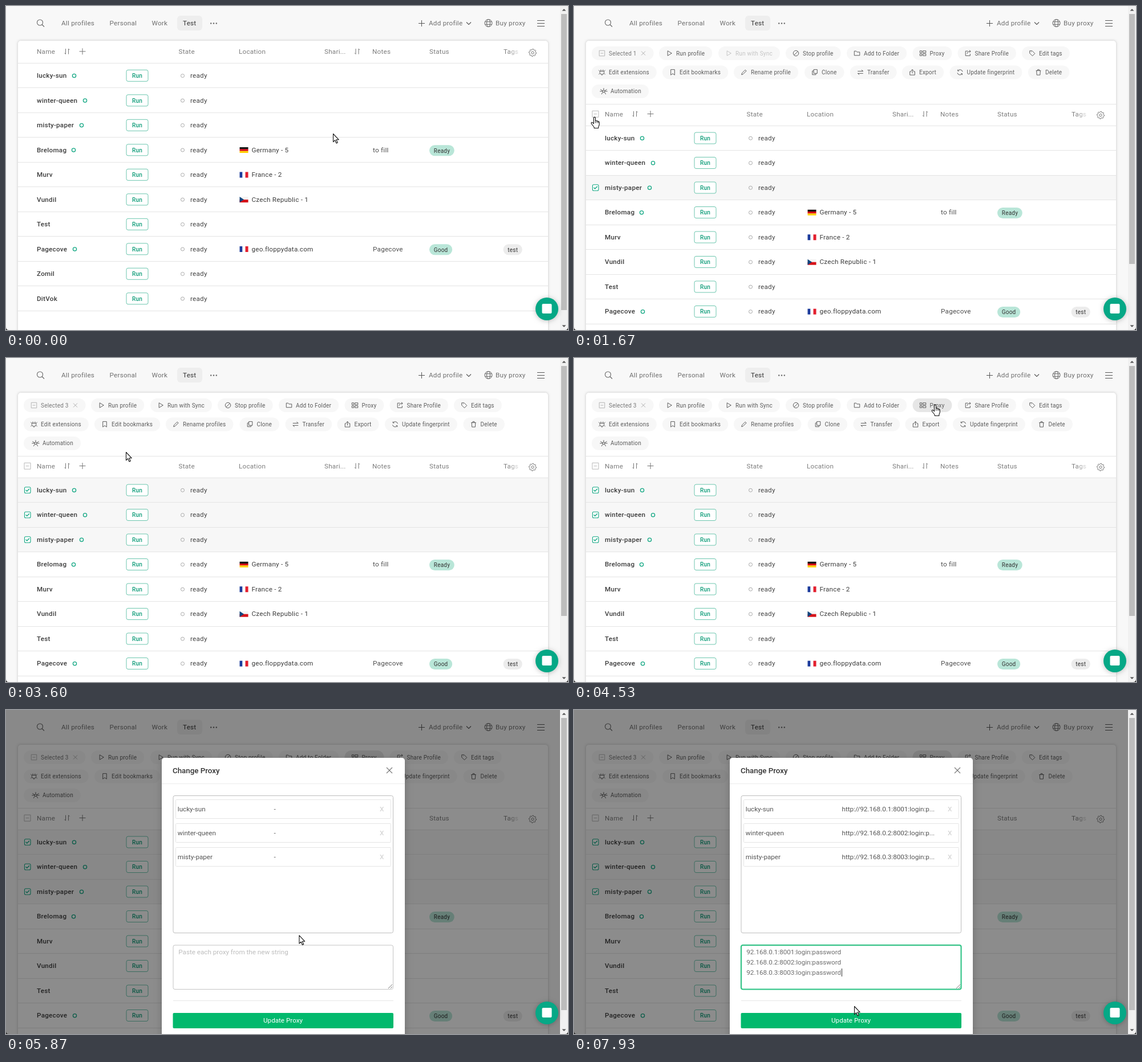
Animation, 985 px wide and 569 px high, one loop 8000 ms. Source, as an HTML page with a canvas:

```html
<!DOCTYPE html>
<html lang="en">
<head>
<title>Change proxy</title>
<style>
html, body { margin: 0; width: 100%; height: 100%; overflow: hidden; background: #f8f8f8; }
canvas { display: block; }
</style>
</head>
<body>
<canvas id="c" width="985" height="569"></canvas>
<script>
const W = 985, H = 569, LOOP = 8000, FPS = 15;
const ctx = document.getElementById('c').getContext('2d');
const GREEN = '#14a884', LINE = '#e4e4e4', GREY = '#6f6f6f', DARK = '#3c3c3c';
const PITCH = 43.5, SHIFT = 109.7;

const ICONS = {
  minus: 'M-5-5h10v10h-10zM-2.5 0h5',
  run: 'M-3-4.5L4.5 0L-3 4.5z',
  stop: 'M5 0a5 5 0 1 1-10 0a5 5 0 1 1 10 0zM-3.5 3.5l7-7',
  folder: 'M-5-4h3.5l1.5 1.8h5v6.2h-10z',
  proxy: 'M-5.5-4.5h3.5v3.5h-3.5zM0-4.5h5.5v3.5h-5.5zM-5.5 1h3.5v3.5h-3.5zM0 1h5.5v3.5h-5.5z',
  share: 'M0-4h-4.5v8.5h8.5v-3.5M-1.5 1c0-3 2-4.5 6-4.5M2.5-5.5l2.5 2l-2.5 2',
  tag: 'M-4.5-4.5h4.5l5 5l-4.5 4.5l-5-5zM-2-2.5h.8',
  plug: 'M-2-5v3M2-5v3M-4-2h8v2a4 4 0 0 1-8 0zM0 4v2M-6-4l2 2M6-4l-2 2M-6 4l2-2M6 4l-2-2',
  mark: 'M-3.5-5h7v10l-3.5-2.5l-3.5 2.5z',
  pen: 'M-4.5 4.5l.8-3l6-6l2 2l-6 6z',
  clone: 'M-2-5h6.5v7h-6.5zM-2-2.5h-2.5v7h6.5v-2.5',
  swap: 'M-5-2h10l-3-2.5M5 2h-10l3 2.5',
  export: 'M-2-1.5h-2.5v6.5h9v-6.5h-2.5M0 2v-7M-2.5-2.8l2.5-2.2l2.5 2.2',
  renew: 'M4.7-1a4.7 4.7 0 0 0-8.7-1.5v-2.5M-4 -2.5h2.5M-4.7 1a4.7 4.7 0 0 0 8.7 1.5v2.5M4 2.5h-2.5',
  bin: 'M-4.5-3h9M-1.5-3v-2h3v2M-3.5-3l.5 8h6l.5-8',
  auto: 'M2 0a2 2 0 1 1-4 0a2 2 0 1 1 4 0zM0-2v-4M-2 0h-5M2 0h5M-1.5 1.5l-2.5 4M1.5 1.5l2.5 4M-6-3.5l4 2.5M6-3.5l-4 2.5',
  sort: 'M-2.5-4.8v9.5l-2-2M2.5 4.8v-9.5l2 2',
  plus: 'M-5.5 0h11M0-5.5v11',
  cross: 'M-1-1l2 2M1-1l-2 2',
  globe: 'M6.5 0a6.5 6.5 0 1 1-13 0a6.5 6.5 0 1 1 13 0zM3 0a3 6.5 0 1 1-6 0a3 6.5 0 1 1 6 0zM-6-2.3h12M-6 2.3h12',
  search: 'M4-1a5 5 0 1 1-10 0a5 5 0 1 1 10 0zM2.5 2.5l4 4',
  check: 'M-3-.3l2.2 2.3l4-4.2'
};
for (const k in ICONS) ICONS[k] = new Path2D(ICONS[k]);

const ROWS = [
  { name: 'lucky-sun', ring: 119.5 },
  { name: 'winter-queen', ring: 138.5 },
  { name: 'misty-paper', ring: 132.5 },
  { name: 'Brelomag', ring: 118.5, flag: 'de', place: 'Germany - 5', note: 'to fill', status: 'Ready' },
  { name: 'Murv', flag: 'fr', place: 'France - 2' },
  { name: 'Vundil', flag: 'cz', place: 'Czech Republic - 1' },
  { name: 'Test' },
  { name: 'Pagecove', ring: 120.5, flag: 'fr', place: 'geo.floppydata.com', note: 'Pagecove', status: 'Good', tag: 'test' },
  { name: 'Zomil' },
  { name: 'DitVok' }
];

// icon, label, text x, row
const TOOLS = [
  ['minus', 'Selected ', 61, 0], ['run', 'Run profile', 179, 0], ['run', 'Run with Sync', 283, 0],
  ['stop', 'Stop profile', 401, 0], ['folder', 'Add to Folder', 508, 0], ['proxy', 'Proxy', 623.5, 0],
  ['share', 'Share Profile', 702.5, 0], ['tag', 'Edit tags', 815, 0],
  ['plug', 'Edit extensions', 61, 1], ['mark', 'Edit bookmarks', 185, 1], ['pen', 'Rename profile', 310, 1],
  ['clone', 'Clone', 434, 1], ['swap', 'Transfer', 514, 1], ['export', 'Export', 605, 1],
  ['renew', 'Update fingerprint', 688.5, 1], ['bin', 'Delete', 826, 1], ['auto', 'Automation', 64, 2]
];

// time, pointer x, pointer y
const PATH = [
  [0, 573, 224], [200, 573, 224], [333, 584, 222], [470, 520, 205], [670, 330, 181], [870, 130, 190],
  [1067, 38, 206], [1133, 37, 204], [1333, 36, 200], [1533, 36, 200],
  [1667, 36, 195], [1870, 36, 205], [2130, 37, 240], [2400, 37, 278], [2600, 37, 277],
  [2667, 37, 267], [2800, 37, 252], [3000, 37, 231], [3200, 37, 231],
  [3470, 130, 195], [3730, 290, 135], [3930, 410, 92], [4070, 490, 86], [4200, 560, 85],
  [4330, 605, 84], [4530, 633, 82], [4900, 633, 82], [4933, 633, 83], [5200, 633, 83],
  [5600, 570, 250], [5930, 500, 430], [6070, 480, 450], [6530, 480, 450], [6733, 480, 390],
  [6930, 478, 290], [7130, 474, 200], [7330, 476, 185], [7530, 485, 250], [7670, 492, 360],
  [7800, 498, 478], [7867, 495, 500], [7933, 491, 520], [8000, 491, 520]
];

function pointer(t) {
  let i = 1;
  while (i < PATH.length - 1 && PATH[i][0] < t) i++;
  const a = PATH[i - 1], b = PATH[i];
  const k = Math.max(0, Math.min(1, (t - a[0]) / (b[0] - a[0])));
  return { x: a[1] + (b[1] - a[1]) * k, y: a[2] + (b[2] - a[2]) * k };
}

function text(s, x, y, color, size = 11.67, gap = 0.25, weight = 400, align = 'left') {
  ctx.font = `${weight} ${size}px Roboto, sans-serif`;
  ctx.letterSpacing = gap + 'px';
  ctx.textAlign = align;
  ctx.fillStyle = color;
  ctx.fillText(s, x, y);
}

function rect(x, y, w, h, color) {
  ctx.fillStyle = color;
  ctx.fillRect(x, y, w, h);
}

function box(x, y, w, h, r, fill, stroke, lw = 1) {
  ctx.beginPath();
  ctx.roundRect(x, y, w, h, r);
  if (fill) { ctx.fillStyle = fill; ctx.fill(); }
  if (stroke) { ctx.strokeStyle = stroke; ctx.lineWidth = lw; ctx.stroke(); }
}

function icon(name, x, y, color, lw = 1, scale = 1) {
  ctx.save();
  ctx.translate(x, y);
  ctx.scale(scale, scale);
  ctx.strokeStyle = color;
  ctx.lineWidth = lw / scale;
  ctx.stroke(ICONS[name]);
  ctx.restore();
}

function ring(x, y, r, color, lw) {
  ctx.beginPath();
  ctx.arc(x, y, r, 0, 7);
  ctx.strokeStyle = color;
  ctx.lineWidth = lw;
  ctx.stroke();
}

function dots(x, y, color) {
  for (let i = -1; i < 2; i++) {
    ctx.beginPath();
    ctx.arc(x + i * 4.8, y, 1.2, 0, 7);
    ctx.fillStyle = color;
    ctx.fill();
  }
}

function line(points, color, lw) {
  ctx.beginPath();
  points.forEach(p => ctx.lineTo(p[0], p[1]));
  ctx.strokeStyle = color;
  ctx.lineWidth = lw;
  ctx.stroke();
}

function nav() {
  icon('search', 60.5, 30, '#666', 1.1);
  text('All profiles', 97, 34, GREY);
  text('Personal', 181.5, 34, GREY);
  text('Work', 255.5, 34, GREY);
  box(300, 17, 44, 26, 6, '#eeeeee');
  text('Test', 310, 34, '#333');
  dots(364, 30.5, '#666');
  icon('plus', 728.5, 30.5, '#555');
  text('Add profile', 741, 34, GREY);
  line([[807, 28.5], [811, 32.5], [815, 28.5]], '#555', 1.1);
  icon('globe', 845.5, 30, '#666');
  text('Buy proxy', 858, 34, GREY);
  for (const y of [25, 30, 35]) rect(931, y, 13, 1, '#555');
}

function toolbar(n, p) {
  for (const [ic, label, x0, row] of TOOLS) {
    const first = ic === 'minus';
    const x = x0 + (n > 1 && row === 1 && x0 > 400 ? 5.5 : 0);
    const y = 83 + row * 33.4;
    const s = first ? label + n : ic === 'pen' && n > 1 ? label + 's' : label;
    const off = label === 'Run with Sync' && n < 2;
    ctx.font = '400 10px Roboto, sans-serif';
    ctx.letterSpacing = '0.2px';
    const left = ic === 'auto' ? 31 : x - 30;
    const right = x + ctx.measureText(s).width + (first ? 30 : 13);
    const hot = !off && p.x > left && p.x < right && Math.abs(p.y - y) < 12;
    if (hot) p.hand = true;
    box(left, y - 12, right - left, 24, 12, hot ? '#e6e6e6' : '#f7f7f7');
    const color = off ? '#c4c4c4' : '#5c5c5c';
    icon(ic, x - 12, y, first ? '#b5b5b5' : color, 1, 0.95);
    text(s, x, y + 3.6, first ? '#777' : color, 10, 0.2);
    if (first) icon('cross', 121.5, y, '#b0b0b0', 1, 3.5);
  }
  rect(21, 172, 929, 1, LINE);
}

function gear(x, y) {
  ctx.beginPath();
  for (let i = 0; i <= 32; i++) {
    const a = i / 32 * Math.PI * 2, r = i % 4 < 2 ? 6.6 : 5.1;
    ctx.lineTo(x + r * Math.cos(a), y + r * Math.sin(a));
  }
  ctx.strokeStyle = '#777';
  ctx.lineWidth = 1;
  ctx.stroke();
  ring(x, y, 2.2, '#777', 1);
}

function head(dy, n) {
  const y = 84 + dy, mid = 79.8 + dy;
  if (n) icon('minus', 37.5, mid + 0.2, '#b8b8b8', 1, 1.1);
  const cols = [['Name', 54], ['State', 302.5], ['Location', 408], ['Shari...', 558], ['Notes', 642], ['Status', 742], ['Tags', 872]];
  for (const [s, x] of cols) text(s, x, y, '#7d7d7d');
  const fade = ctx.createLinearGradient(880, 0, 903, 0);
  fade.addColorStop(0, 'rgba(255,255,255,0)');
  fade.addColorStop(1, '#fff');
  rect(880, mid - 8, 24, 16, fade);
  icon('sort', 107, mid, '#777');
  icon('sort', 615.5, mid, '#777');
  icon('plus', 134, mid, '#777');
  gear(923, 82 + dy);
  rect(21, Math.round(100 + dy), 929, 1, LINE);
}

function flag(kind, x, y) {
  const c = { de: ['#111', '#d8000f', '#ffce00'], fr: ['#1d3c9c', '#fff', '#e3202f'], cz: ['#f4f4f4', '#d7141a'] }[kind];
  c.forEach((col, i) => {
    if (kind === 'fr') rect(x + i * 5, y, 5, 10, col);
    else rect(x, y + i * 10 / c.length, 15, 10 / c.length, col);
  });
  if (kind === 'cz') {
    ctx.beginPath();
    ctx.moveTo(x, y);
    ctx.lineTo(x + 7.5, y + 5);
    ctx.lineTo(x, y + 10);
    ctx.fillStyle = '#11457e';
    ctx.fill();
  }
}

function chip(s, x, y, bg) {
  ctx.font = '400 10px Roboto, sans-serif';
  ctx.letterSpacing = '0.2px';
  box(x, y - 9.5, ctx.measureText(s).width + 15.5, 19, 9.5, bg);
  text(s, x + 7.8, y + 3.8, '#333', 10, 0.2);
}

function tableRow(r, i, dy, checked, hot) {
  const y = 122 + i * PITCH + dy, base = y + 4;
  if (checked || hot) rect(21, Math.round(y - 21), 929, 43, '#f7f7f7');
  rect(21, Math.round(y + 21.3), 929, 1, LINE);
  if (checked || hot) {
    box(32.5, y - 5, 10.5, 10.5, 2, '#fff', checked ? GREEN : '#bbb', 1.1);
    if (checked) icon('check', 37.6, y + 0.3, GREEN, 1.4);
  }
  if (hot) dots(269, y + 0.5, '#777');
  text(r.name, 54, base, DARK, 11.67, 0.25, 500);
  if (r.ring) ring(r.ring, y + 0.5, 3.1, GREEN, 1.3);
  box(211, y - 9.7, 38, 20, 3, '#fff', '#6cc6ae');
  text('Run', 230, y + 4, '#0c9c78', 10, 0.2, 500, 'center');
  ring(309.5, y + 0.5, 3, '#a8a8a8', 1);
  text('ready', 323, base, '#444');
  if (r.flag) {
    flag(r.flag, 409.5, y - 4.5);
    text(r.place, 430.5, base, DARK);
  }
  if (r.note) text(r.note, 643, base, '#4c4c4c');
  if (r.status) chip(r.status, 742, y + 1.3, '#b9e6d8');
  if (r.tag) chip(r.tag, 871.5, y + 1.3, '#ececec');
}

function scrollbar(end) {
  rect(971, 0, 14, H, '#f1f1f1');
  rect(973, 14, 10, end - 14, '#bdbdbd');
  for (const [y, d] of [[7, -1], [562, 1]]) {
    ctx.beginPath();
    ctx.moveTo(974.5, y - 1.5 * d);
    ctx.lineTo(981.5, y - 1.5 * d);
    ctx.lineTo(978, y + 2 * d);
    ctx.fillStyle = '#555';
    ctx.fill();
  }
}

function chat() {
  ctx.save();
  ctx.shadowColor = 'rgba(0,0,0,.25)';
  ctx.shadowBlur = 8;
  ctx.shadowOffsetY = 1;
  ctx.beginPath();
  ctx.arc(948, 532, 20, 0, 7);
  ctx.fillStyle = '#06a886';
  ctx.fill();
  ctx.restore();
  box(939.5, 523, 17, 17, 2, '#fff');
}

function modal(t) {
  const focus = Math.max(0, Math.min(1, (t - 5930) / 200));
  const pasted = t > 6330;
  ctx.save();
  ctx.shadowColor = 'rgba(0,0,0,.2)';
  ctx.shadowBlur = 14;
  ctx.shadowOffsetY = 4;
  box(273, 84, 426, 520, 5, '#fff');
  ctx.restore();
  text('Change Proxy', 292, 110.5, '#333', 13.33, 0, 500);
  icon('cross', 672, 106, '#777', 1.1, 5);
  rect(273, 129, 426, 1, '#ebebeb');
  box(293, 150.5, 385.5, 241, 3, '#fff', '#bdbdbd');
  for (let i = 0; i < 3; i++) {
    const y = 157 + i * 42;
    box(297.5, y + 0.5, 377, 33, 1, null, '#e4e4e4');
    text(ROWS[i].name, 300.8, y + 20.5, '#555', 11.67, 0);
    const url = `http://92.168.0.${i + 1}:800${i + 1}:login:p...`;
    text(pasted ? url : '-', 469.5, y + 20.5, '#555', 11.67, 0);
    text('X', 655, y + 20.5, '#d6d6d6', 11.67, 0, 500);
  }
  box(293, 413, 385.5, 77.5, 3, '#fff', '#c4c4c4');
  if (focus) {
    ctx.globalAlpha = focus;
    box(293, 413, 385.5, 77.5, 3, null, 'rgba(0,185,107,.2)', 3.4);
    box(293, 413, 385.5, 77.5, 3, null, '#16bd78', 1.5);
    ctx.globalAlpha = 1;
  }
  line([[670, 489], [677, 482]], '#777', 1);
  line([[674, 489], [677, 486]], '#777', 1);
  if (pasted) {
    for (let i = 1; i < 4; i++)
      text(`92.168.0.${i}:800${i}:login:password`, 302.3, 411.8 + i * 17.6, '#6c6c6c', 11.67, 0);
    rect(469, 454, 1, 14, '#333');
  } else {
    text('Paste each proxy from the new string', 302.3, 429.4, '#bdbdbd', 11.67, 0);
    if (focus) rect(302, 419, 1, 14, '#333');
  }
  rect(293, 510, 386, 1, '#e6e6e6');
  box(292.5, 532, 386.5, 27, 2, '#02b96d');
  text('Update Proxy', 485.5, 549.3, '#fff', 11.67, 0, 400, 'center');
}

const ARROW = new Path2D('M.5.5v14.2l3.2-3l2.3 5.3l2.2-1l-2.3-5.2h4.4z');
const HAND = new Path2D('M-1.5 1.5c0-1.8 3-1.8 3 0v5.5c.5-1 2.5-1 2.7.3c.7-.8 2.2-.4 2.3.8c.6-.6 1.8-.2 1.8 1v4c0 2-1.5 3-1.5 5v1.4h-7.5v-1.4c-1-2.5-4-4.6-5-7c-.6-1.6 1.2-2.4 2.4-1.2l1.8 1.8z');
const BEAM = new Path2D('M-3-6.5h2l1 1l1-1h2M0-5.5v11M-3 6.5h2l1-1l1 1h2');

function cursor(p, kind) {
  ctx.save();
  ctx.translate(p.x, p.y);
  ctx.lineJoin = 'round';
  if (kind === 'beam') {
    ctx.strokeStyle = '#222';
    ctx.lineWidth = 1;
    ctx.stroke(BEAM);
  } else {
    const shape = kind === 'hand' ? HAND : ARROW;
    ctx.fillStyle = '#fff';
    ctx.fill(shape);
    ctx.strokeStyle = '#111';
    ctx.lineWidth = 1.1;
    ctx.stroke(shape);
    if (kind === 'hand') {
      for (const x of [1.5, 4.2, 6.5]) line([[x, 7.5], [x, 10.5]], '#111', 0.9);
    }
  }
  ctx.restore();
}

function corners() {
  ctx.fillStyle = '#222';
  for (const [x, d] of [[0, 1], [W, -1]]) {
    ctx.beginPath();
    ctx.moveTo(x, H);
    ctx.lineTo(x, H - 5);
    ctx.quadraticCurveTo(x, H, x + 5 * d, H);
    ctx.fill();
  }
}

function draw(t) {
  const p = pointer(t);
  const open = t > 4920;
  const bar = t > 1590;
  const n = t > 3260 ? 3 : t > 2720 ? 2 : bar ? 1 : 0;
  const checked = [t > 3260, t > 2720, t > 1320];
  const dy = bar ? SHIFT : 0;

  rect(0, 0, W, H, '#f8f8f8');
  nav();
  ctx.save();
  ctx.shadowColor = 'rgba(0,0,0,.22)';
  ctx.shadowBlur = 4;
  box(21, 61, 929, 600, 5, '#fff');
  ctx.restore();
  // the trigger stays highlighted while the modal is open
  const q = open ? { x: 633, y: 83 } : p;
  if (bar) toolbar(n, q);
  head(dy, n);
  const top = 100.3 + dy;
  ROWS.forEach((r, i) => {
    const y = top + i * PITCH;
    const hot = !open && t > 260 && p.y >= y && p.y < y + PITCH;
    tableRow(r, i, dy, checked[i], hot);
  });
  if (open) {
    rect(0, 0, 971, H, `rgba(0,0,0,${t < 4990 ? 0.43 : 0.45})`);
    modal(t);
  }
  scrollbar(open ? 527 : bar ? 453 : 534);
  chat();
  corners();
  let kind = 'arrow';
  if (open) {
    if (p.y > 413 && p.y < 491) kind = 'beam';
  } else if (q.hand || (p.x < 37.5 && p.y > 172)) kind = 'hand';
  cursor(p, kind);
}

const start = performance.now();
function tick() {
  const t = (performance.now() - start) % LOOP;
  draw(Math.floor(t * FPS / 1000 + 0.05) * 1000 / FPS);
  requestAnimationFrame(tick);
}
tick();
</script>
</body>
</html>
```
